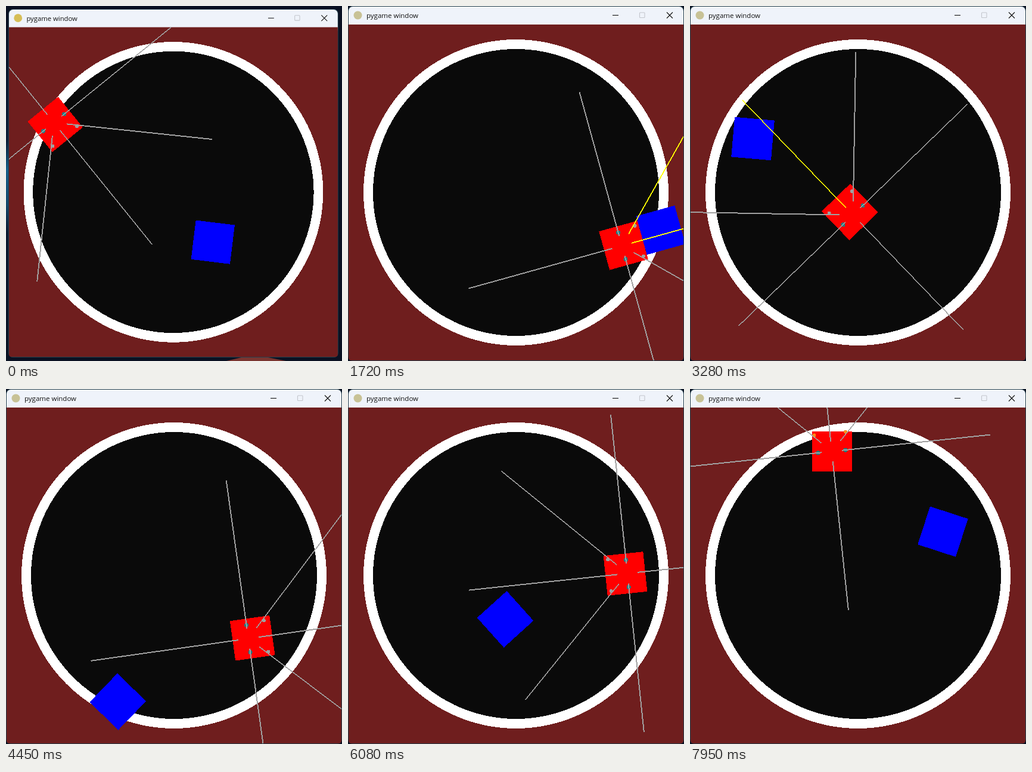
An HTML page for the animation above (8 s loop, 564x594 px).

```html
<!DOCTYPE html>
<html lang="en">
<head>
<meta charset="utf-8">
<title>Robot arena</title>
<style>
  html, body { margin: 0; width: 100%; height: 100%; overflow: hidden; background: #0a1122; }
  svg { display: block; width: 564px; height: 594px; }
  text { font: 11.5px "Open Sans", "Noto Sans", sans-serif; fill: #111; }
  #arena { shape-rendering: crispEdges; }
</style>
</head>
<body>
<svg viewBox="0 0 564 594">
  <defs>
    <linearGradient id="desk" x1="0" y1="0" x2="0" y2="1">
      <stop offset="0" stop-color="#0a1122"/>
      <stop offset=".38" stop-color="#0d1f38"/>
      <stop offset=".46" stop-color="#17608a"/>
      <stop offset=".56" stop-color="#15486c"/>
      <stop offset=".64" stop-color="#0b1930"/>
      <stop offset="1" stop-color="#0b1424"/>
    </linearGradient>
    <clipPath id="frame"><rect width="564" height="594" rx="8"/></clipPath>
    <clipPath id="view"><rect x="1" y="31" width="562" height="562"/></clipPath>
  </defs>

  <rect width="564" height="594" fill="#0a1122"/>
  <rect width="6" height="594" fill="url(#desk)"/>
  <path d="M370 594 L395 588 H440 L470 594 Z" fill="#7a3530"/>

  <g id="window" clip-path="url(#frame)">
    <rect width="564" height="594" fill="#27404c"/>
    <rect x="1" y="1" width="562" height="40" rx="7" fill="#eff3fa"/>
    <circle id="icon" cx="16.5" cy="15.5" r="7"/>
    <text x="31" y="20">pygame window</text>
    <g fill="none" stroke="#111" stroke-width="1.1">
      <path d="M444 15.5 H454"/>
      <rect x="489.5" y="11" width="8.5" height="8.5" rx="1" stroke="#c3c6cc"/>
      <path d="M535 10.5 L545 20.5 M545 10.5 L535 20.5"/>
    </g>
    <g id="arena" clip-path="url(#view)">
      <rect x="1" y="31" width="562" height="562" fill="#6f1e1e"/>
      <circle cx="282" cy="312" r="256" fill="#fff"/>
      <circle cx="282" cy="312" r="240" fill="#0a0a0a"/>
      <rect id="box" x="-33.5" y="-33.5" width="67" height="67" fill="#00f"/>
      <rect id="robot" x="-33.5" y="-33.5" width="67" height="67" fill="#f00"/>
      <g id="sensors"></g>
    </g>
  </g>
</svg>

<script>
const LOOP = 8000, STEP = 68;

// time, x, y, heading
const route = [
  [0, 80.1, 196.7, 51],
  [850, 276, 401, 0],
  [1720, 462.5, 400.5, -15.5],
  [1900, 503, 389, -16],
  [2600, 455, 405, -165],
  [3280, 268.3, 344.5, -134],
  [3480, 158, 262, -142],
  [3680, 118, 230, -142],
  [3860, 130, 238, 45],
  [4170, 305, 412, 2],
  [4450, 413.7, 416.7, -8],
  [4540, 465, 410, -8],
  [4950, 455, 415, -195],
  [5330, 252, 497, -202],
  [5470, 224, 508, -200],
  [5880, 470, 312, -45],
  [6080, 465.5, 309, -186],
  [6700, 287, 322, -228],
  [6950, 247.2, 377.5, -238],
  [7300, 194, 466, -238],
  [7480, 198, 462, -90],
  [7950, 238, 104.5, -96],
  [LOOP, 238, 104.5, -90]
];

// push begins, round ends, x, y, angle, velocity
const rounds = [
  [880, 1850, 349.6, 397.3, 7, .2088, -.0265],
  [3480, 3680, 105.5, 222, 5, -.2, -.16],
  [5330, 5470, 187.7, 523.2, 44, -.2, .085],
  [6700, 7300, 264, 385.3, 48, -.174, .219],
  [LOOP, LOOP, 424.5, 238.7, 18, 0, 0]
];

const $ = id => document.getElementById(id);
const rad = deg => deg * Math.PI / 180;
const clamp = (v, lo, hi) => Math.min(hi, Math.max(lo, v));

function set(el, attrs) {
  for (const name in attrs) el.setAttribute(name, attrs[name]);
}

function add(tag, props) {
  const el = document.createElementNS('http://www.w3.org/2000/svg', tag);
  return { el: $('sensors').appendChild(el), ...props };
}

const dots = [];
for (const side of [-1, 1]) {
  dots.push(add('circle', { ahead: 0, side: side * 23, r: 3.5 }));
  dots.push(add('circle', { ahead: 30, side: side * 26.5, r: 3 }));
}
const rays = [-90, -45, 0, 45, 90, 180].map(turn => add('line', { turn }));

// Position is held for about one step at a time.
function robotAt(t) {
  const i = route.findIndex((p, n) => n && t < p[0]);
  const [t0, x0, y0, h0] = route[i - 1], [t1, x1, y1, h1] = route[i];
  const span = t1 - t0, steps = Math.max(1, Math.round(span / STEP));
  const k = Math.floor((t - t0) / span * steps) / steps;
  const speed = Math.hypot(x1 - x0, y1 - y0) / span;
  return {
    time: t0 + span * k,
    x: x0 + (x1 - x0) * k,
    y: y0 + (y1 - y0) * k,
    heading: h0 + (h1 - h0) * k,
    lag: Math.min(7.5, speed * 12),
    lead: speed < .05 ? clamp((h1 - h0) / span * 50, -6, 6) : 0
  };
}

// A pushed box turns until it lies flush against the robot.
function boxAt({ time, heading }) {
  const [begin, , x, y, angle, vx, vy] = rounds.find(r => time < r[1]);
  const age = Math.max(0, time - begin);
  const gap = heading - angle + 45;
  const turn = gap - Math.floor(gap / 90) * 90 - 45;
  return [x + vx * age, y + vy * age, angle + turn * Math.min(1, age / 250)];
}

function hitsBox(x, y, dx, dy, [bx, by, angle]) {
  const c = Math.cos(rad(angle)), s = Math.sin(rad(angle));
  for (let d = 0; d <= 250; d += 2) {
    const px = x + dx * d - bx, py = y + dy * d - by;
    if (Math.abs(px * c + py * s) < 35.5 && Math.abs(py * c - px * s) < 35.5) return true;
  }
  return false;
}

function place(el, x, y, angle) {
  set(el, { transform: `translate(${x} ${y}) rotate(${angle})` });
}

function draw(t) {
  const robot = robotAt(t), box = boxAt(robot);
  const { x, y, heading, lag, lead } = robot;
  const c = Math.cos(rad(heading)), s = Math.sin(rad(heading));
  const cx = x - c * lag, cy = y - s * lag;

  const opening = t < 60;
  set($('window'), { transform: opening ? 'translate(4 5) scale(.982)' : '' });
  set($('icon'), { fill: opening ? '#d6be58' : '#c8c296' });
  place($('box'), ...box);
  place($('robot'), x, y, heading + lead);

  for (const { el, ahead, side, r } of dots) {
    const px = cx + c * ahead - s * side, py = cy + s * ahead + c * side;
    const onRing = Math.hypot(px - 282, py - 312) > 240;
    const fill = !ahead ? '#1b7f85' : onRing ? '#ff8c1a' : '#a0a0a0';
    set(el, { cx: px, cy: py, r, fill });
  }

  for (const { el, turn } of rays) {
    const a = rad(heading + turn), dx = Math.cos(a), dy = Math.sin(a);
    const start = Math.abs(turn) === 45 ? 22.5 : 17;
    const x1 = cx + dx * start, y1 = cy + dy * start;
    set(el, {
      x1, y1, x2: x1 + dx * 250, y2: y1 + dy * 250,
      stroke: hitsBox(x1, y1, dx, dy, box) ? '#ff0' : '#a0a0a0',
      'stroke-width': 2 * Math.max(Math.abs(dx), Math.abs(dy))
    });
  }
}

function tick() {
  draw(performance.now() % LOOP);
  requestAnimationFrame(tick);
}
tick();
</script>
</body>
</html>
```
